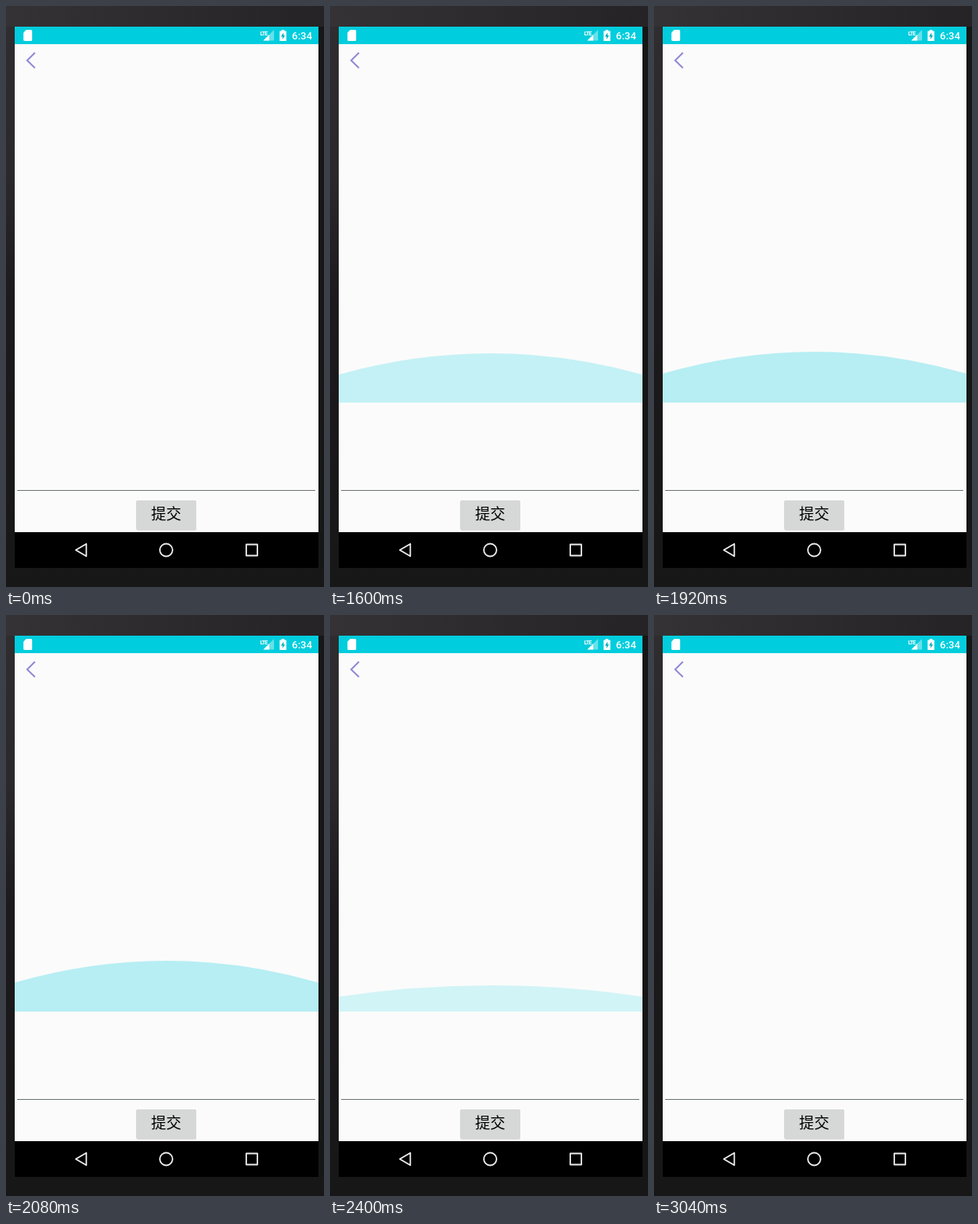
An HTML page that plays this animation: 401x731 px, repeating every 4 s.

```html
<!DOCTYPE html>
<html lang="zh">
<head>
<meta charset="utf-8">
<title>Arc reveal</title>
<style>
  html, body { margin: 0; width: 100%; height: 100%; overflow: hidden; background: #19181a; }
  svg { display: block; width: 401px; height: 731px; }
  .time { font: 500 13px Roboto, "Open Sans", sans-serif; }
  .lte { font: 700 7px Roboto, "Open Sans", sans-serif; letter-spacing: -.8px; }
  .label { font: 19px "Noto Sans CJK SC", "Noto Sans CJK", "Noto Sans CJK JP", sans-serif; }
</style>
</head>
<body>
<svg viewBox="0 0 401 731">
  <defs>
    <linearGradient id="side" x2="0" y2="1">
      <stop offset="0" stop-color="#302d30"/>
      <stop offset=".3" stop-color="#2a282a"/>
      <stop offset=".5" stop-color="#1c1a1c"/>
      <stop offset="1" stop-color="#181718"/>
    </linearGradient>
    <linearGradient id="top">
      <stop offset="0" stop-color="#343235"/>
      <stop offset="1" stop-color="#262326"/>
    </linearGradient>
  </defs>

  <!-- device -->
  <rect width="401" height="731" fill="url(#side)"/>
  <rect width="401" height="26" fill="url(#top)"/>
  <rect x="394" y="26" width="7" height="681" fill="#171617"/>
  <rect x="11" y="26" width="383" height="22" fill="#00cddd"/>
  <rect x="11" y="48" width="383" height="614" fill="#fbfbfb"/>
  <rect x="11" y="662" width="383" height="45"/>

  <!-- status bar -->
  <g fill="#fff">
    <path d="M25.500 30H31.500Q33 30 33 31.500V42.500Q33 44 31.500 44H23.500Q22 44 22 42.500V33.500Z"/>
    <path d="M338 30V43.500H324.500Z" opacity=".4"/>
    <path d="M332 36V43.500H324.500Z"/>
    <text class="lte" x="320.500" y="36.500">LTE</text>
    <path d="M347.500 30H351V31.500H353.500V44H345V31.500H347.500Z"/>
    <path d="M350 33.500L346.800 38.500H348.700V42L351.800 37H350Z" fill="#00aebc"/>
    <text class="time" x="360.500" y="42">6:34</text>
  </g>

  <!-- page -->
  <path d="M36.500 58.800L26.700 68.500L36.500 78" fill="none" stroke="#8f88d6" stroke-width="2"/>
  <path id="arc" fill="#00cddd"/>
  <rect x="14" y="609" width="376" height="1" fill="#6c7273"/>
  <rect x="164.500" y="623" width="75.500" height="37" rx="2" fill="#c9c9c9" opacity=".6"/>
  <rect x="164" y="622" width="76" height="37" rx="2" fill="#d6d7d7"/>
  <text class="label" x="202" y="646" text-anchor="middle">提交</text>

  <!-- navigation -->
  <g fill="none" stroke="#ececec" stroke-width="1.800" stroke-linejoin="round">
    <path d="M88 684.500L101.300 676.700V692.300Z"/>
    <circle cx="202" cy="684.500" r="8"/>
    <rect x="303" y="677.500" width="14" height="14"/>
  </g>
</svg>
<script>
  const LOOP = 4000, START = 1280, STEP = 160;
  const LEFT = 11, RIGHT = 394, BASE = 499, SHOULDER = 0.57;

  // [height, opacity] of the arc at each step
  const poses = [
    [50, .08], [57, .16], [62, .22], [63, .26], [64, .275], [64, .275],
    [53, .23], [33, .17], [20, .1], [9, .03], [2, .015]
  ];
  const arc = document.getElementById("arc");

  function arcPath(height) {
    const side = BASE - height * SHOULDER;
    const control = BASE - height * (2 - SHOULDER);
    const mid = (LEFT + RIGHT) / 2;
    return `M${LEFT} ${BASE}V${side}Q${mid} ${control} ${RIGHT} ${side}V${BASE}Z`;
  }

  function draw() {
    const t = performance.now() % LOOP;
    const [height, alpha] = poses[Math.floor((t - START) / STEP)] || [0, 0];
    arc.setAttribute("d", arcPath(height));
    arc.setAttribute("opacity", alpha);
    requestAnimationFrame(draw);
  }
  draw();
</script>
</body>
</html>
```
